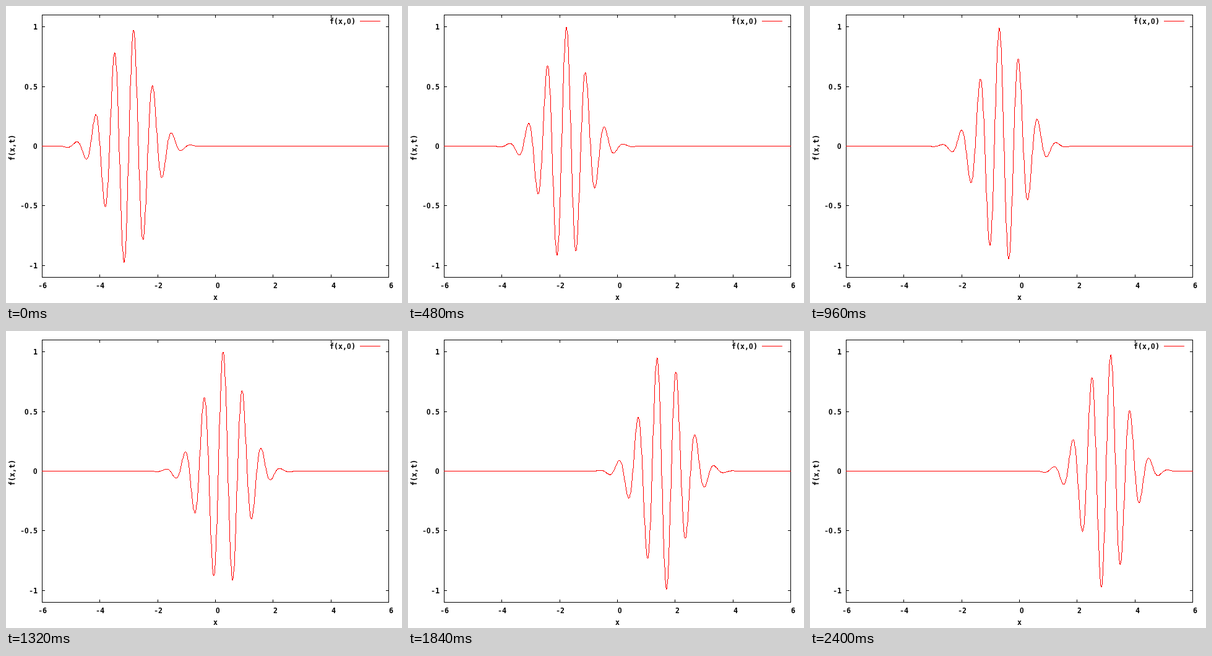
Write a matplotlib script that moves like this. It is 640 px wide and 480 px high and loops after 2.44 s.

```python
import numpy as np
import matplotlib.pyplot as plt
from matplotlib.animation import FuncAnimation

W, H, DPI = 640, 480, 100
PX = 72 / DPI                       # points per pixel
LEFT, RIGHT, TOP, BOTTOM = 58, 618, 14, 438
CELL = 7                            # width of one character cell
FRAMES, INTERVAL = 61, 40
RED = (255, 0, 0, 255)
FONT = dict(weight="bold", size=11.63 * PX, ha="center", va="baseline")

fig = plt.figure(figsize=(W / DPI, H / DPI), dpi=DPI, facecolor="white")
ax = fig.add_axes([0, 0, 1, 1])
ax.set_xlim(0, W)
ax.set_ylim(H, 0)
ax.axis("off")


def whole(v):
    return np.floor(np.asarray(v) + 0.5).astype(int)


def to_px(x, y):
    """Map plot values to pixel columns and rows."""
    col = LEFT + (x + 6) * (RIGHT - LEFT) / 12
    row = BOTTOM - (y + 1.1) * (BOTTOM - TOP) / 2.2
    return whole(col), whole(row)


def stroke(cols, rows, color="black"):
    """Draw a hard one pixel line through pixel centres."""
    ax.plot(np.add(cols, 0.5), np.add(rows, 0.5), color=color, lw=PX,
            antialiased=False, snap=False, solid_capstyle="projecting")


def trace(cols, rows):
    """List every pixel on the one pixel wide path through the points."""
    steps = np.maximum(abs(np.diff(cols)), abs(np.diff(rows)))
    dist = np.concatenate([[0], np.cumsum(steps)])
    walk = np.arange(dist[-1] + 1)
    return whole(np.interp(walk, dist, cols)), whole(np.interp(walk, dist, rows))


def label(text, x, y):
    """Write text in fixed cells, starting at x on the baseline y."""
    for i, ch in enumerate(text):
        # a sans zero has no dot inside
        family = "Liberation Sans" if ch == "0" else "DejaVu Sans Mono"
        ax.text(x + (i + 0.5) * CELL, y, ch, family=family, **FONT)


# frame and ticks
stroke([LEFT, RIGHT, RIGHT, LEFT, LEFT], [TOP, TOP, BOTTOM, BOTTOM, TOP])

for v in range(-6, 7, 2):
    col, _ = to_px(v, 0)
    stroke([col, col], [BOTTOM, BOTTOM - 4])
    stroke([col, col], [TOP, TOP + 4])
    label(f"{v: d}", col - 6.5, 456)

for v in (-1, -0.5, 0, 0.5, 1):
    _, row = to_px(0, v)
    stroke([LEFT, LEFT + 4], [row, row])
    stroke([RIGHT, RIGHT - 4], [row, row])
    text = f"{v:g}"
    label(text, 50.5 - CELL * len(text), row + 5)

# axis titles and key
label("x", 334.5, 475)
ax.text(14, 227.5, "f(x,t)", family="DejaVu Sans Mono", rotation=90,
        rotation_mode="anchor", **FONT)
label("f(x,0)", 522.5, 29)
stroke([572, 604], [24, 24], "red")

xs = np.linspace(-6, 6, 1000)
canvas = np.zeros((H, W, 4), np.uint8)
wave = ax.imshow(canvas, extent=(0, W, H, 0), aspect="auto",
                 interpolation="nearest", zorder=3)


def update(i):
    # the envelope travels three times as fast as the carrier
    envelope = np.exp(-(xs + 3 - i / 10) ** 2)
    carrier = np.sin(3 * np.pi * (xs + 3 - i / 30))
    cols, rows = trace(*to_px(xs, envelope * carrier))
    canvas[:] = 0
    canvas[rows, cols] = RED
    wave.set_data(canvas)
    return wave,


anim = FuncAnimation(fig, update, frames=FRAMES, interval=INTERVAL,
                     repeat=True, repeat_delay=0)
plt.show()
```
